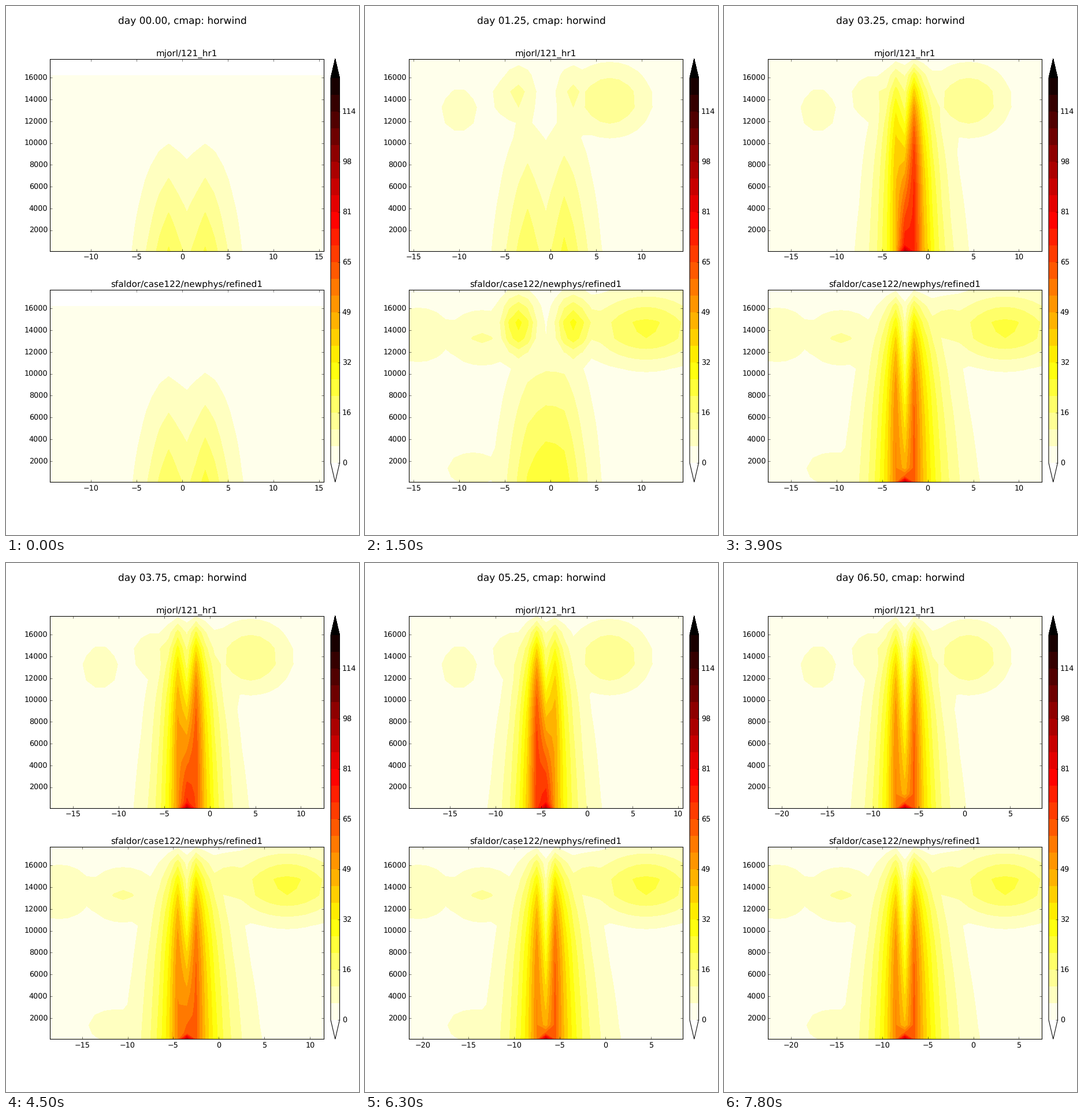
Recreate the animation shown at these times as a matplotlib script. Size 611 px wide and 917 px high, loop 8 s.

```python
import matplotlib.pyplot as plt
import numpy as np
from matplotlib.animation import FuncAnimation
from matplotlib.cm import ScalarMappable
from matplotlib.colors import BoundaryNorm, ListedColormap
from matplotlib.ticker import FuncFormatter

DPI = 76.4
WIDTH, HEIGHT = 611, 917
TICK, STEP = 100, 300  # ms per drawn frame, ms per model output

plt.style.use("classic")
plt.rcParams.update({
    "font.family": "DejaVu Sans",
    "figure.facecolor": "white",
    "savefig.facecolor": "white",
    "savefig.dpi": "figure",
    "text.hinting": "none",
})

# Wind speed is measured in colour bands throughout.
BANDS = 23
BAND_SPEED = 49 / 9
LEVELS = np.arange(BANDS + 1)
CMAP = ListedColormap(plt.get_cmap("hot_r")((LEVELS[:-1] + 0.5) / BANDS))
CMAP = CMAP.with_extremes(under="white", over="black")
NORM = BoundaryNorm(LEVELS, BANDS)

# Model grid: one degree across, stretched upward from 65 m to 17.7 km.
R = np.arange(-15, 16)
Z = 0.065 + 17.655 * np.linspace(0, 1, 16)[:, None] ** 1.3

# Key points of the storm track and of the eye.
DAYS = [0, 1.25, 2.25, 3.25, 4.5, 5.25, 6.5]

# spin: days over which the storm deepens; reach: final decay lengths;
# lean: share by which the right wall is stronger;
# blobs: (distance from eye, height, half width, half height, speed).
UPPER = dict(
    title="mjorl/121_hr1",
    center=[0.5, -0.5, -0.5, -2.5, -3.5, -4.5, -6.5],
    eye=[0.65, 0.6, 1.5, 1.35, 1.2, 1.35, 0.85],
    lean=[0, 0.05, -0.1, 0.25, -0.1, -0.17, 0.06],
    spin=(1.6, 3.3),
    reach=(2, 2.2),
    burst=2.2,
    blobs=[(7, 13.9, 3, 2.2, 2.9),
           (-3.5, 14.2, 1.8, 1.5, 2),
           (-9.5, 13, 2, 2, 1.35)],
)
LOWER = dict(
    title="sfaldor/case122/newphys/refined1",
    center=[0.5, -0.5, -1.5, -2.5, -4.5, -6.5, -7.5],
    eye=[0.65, 1.1, 1.6, 0.85, 1.5, 0.85, 0.8],
    lean=0.06,
    spin=(1, 2.75),
    reach=(2.4, 2.8),
    burst=5.3,
    blobs=[(11, 14.2, 4.5, 2.2, 4.2),
           (5, 14.6, 3, 1.6, 2.7),
           (-7, 13.3, 3, 1.9, 2),
           (-14, 13.6, 3, 2, 1.8),
           (-8, 1.3, 3, 1.6, 1.3)],
)


def at(day, keys):
    return np.interp(day, DAYS, np.broadcast_to(keys, len(DAYS)))


def ease(day, start, end):
    t = np.clip((day - start) / (end - start), 0, 1)
    return t * t * (3 - 2 * t)


def blob(dist, height, half_width, half_height, speed):
    across = (R - dist) / half_width
    up = (Z - height) / half_height
    return speed * np.exp(-(across**2 + up**2) / 2)


def wind(panel, day):
    """Eye between two walls, decaying outward, with outflow aloft."""
    spin = ease(day, *panel["spin"])
    depth = 12.6 + 5.4 * ease(day, 0, 2.25)
    column = (4 + 6.5 * spin) * np.clip(1 - (Z / depth) ** (1 + 3 * spin), 0, 1)
    hollow = at(day, panel["eye"]) * (1 - 0.65 * spin * np.clip(Z / 13, 0, 1))
    eye = np.maximum(column * hollow, 18 * spin * np.exp(-Z / 1.2))

    side = np.where(R < 0, -1, 1)
    wall = column * (1 + side * at(day, panel["lean"]))
    radius = 2 - np.sqrt(spin)
    inside = eye + (wall - eye) * np.clip(abs(R) / radius, 0, 1) ** 1.2

    mature = np.where(R < 0, *panel["reach"])
    reach = 2.96 + (mature * (1 - 0.3 * Z / 13) - 2.96) * spin
    beyond = np.clip(abs(R) - radius, 0, None) / reach
    field = inside * np.exp(-beyond ** (1.4 - 0.4 * spin))

    outflow = ease(day, 0, 1.25)
    burst = panel["burst"] * np.exp(-((day - 1.25) / 0.5) ** 2)
    for *shape, speed in panel["blobs"]:
        field = np.maximum(field, blob(*shape, speed * outflow))
    for dist in (-3, 3):
        field = np.maximum(field, blob(dist, 14.4, 1.4, 1.9, burst))
    field += 0.15
    if day == 0:
        field[-1] = np.nan  # top level is still empty
    return np.ma.masked_invalid(field)


# A hair over the whole size keeps the pixel count from rounding down.
fig = plt.figure(figsize=((WIDTH + 1e-3) / DPI, (HEIGHT + 1e-3) / DPI), dpi=DPI)
heading = fig.suptitle("", fontsize=16)

PANEL_HEIGHT = 0.8 / 2.2
panels = []
for panel, bottom in ((UPPER, 0.9 - PANEL_HEIGHT), (LOWER, 0.1)):
    ax = fig.add_axes([0.125, bottom, 0.775, PANEL_HEIGHT])
    ax.set_title(panel["title"], fontsize=14.4)
    panels.append((ax, panel))

cax = fig.add_axes([562 / WIDTH, 0.1, 15.5 / WIDTH, 0.8])
speed_label = FuncFormatter(lambda band, _: str(int(band * BAND_SPEED + 1e-6)))
bar = fig.colorbar(ScalarMappable(NORM, CMAP), cax=cax, extend="both",
                   ticks=LEVELS[:22:3], format=speed_label)
bar.minorticks_off()

fills = []


def draw(frame):
    day = 0.25 * (frame * TICK // STEP)
    heading.set_text(f"day {day:05.2f}, cmap: horwind")
    while fills:
        fills.pop().remove()
    for ax, panel in panels:
        center = np.round(at(day, panel["center"]) - 0.5) + 0.5
        x = R + center
        fills.append(ax.contourf(x, Z[:, 0] * 1000, wind(panel, day), LEVELS,
                                 cmap=CMAP, norm=NORM, extend="both"))
        ax.set_xticks([t for t in range(-25, 20, 5) if x[0] <= t <= x[-1]])
        ax.set_yticks(range(2000, 16001, 2000))
        ax.set_xlim(x[0], x[-1])
        ax.set_ylim(65, 17720)
    return fills


anim = FuncAnimation(fig, draw, frames=8000 // TICK, init_func=lambda: draw(0),
                     interval=TICK, repeat=True, repeat_delay=0, blit=False)
plt.show()
```
